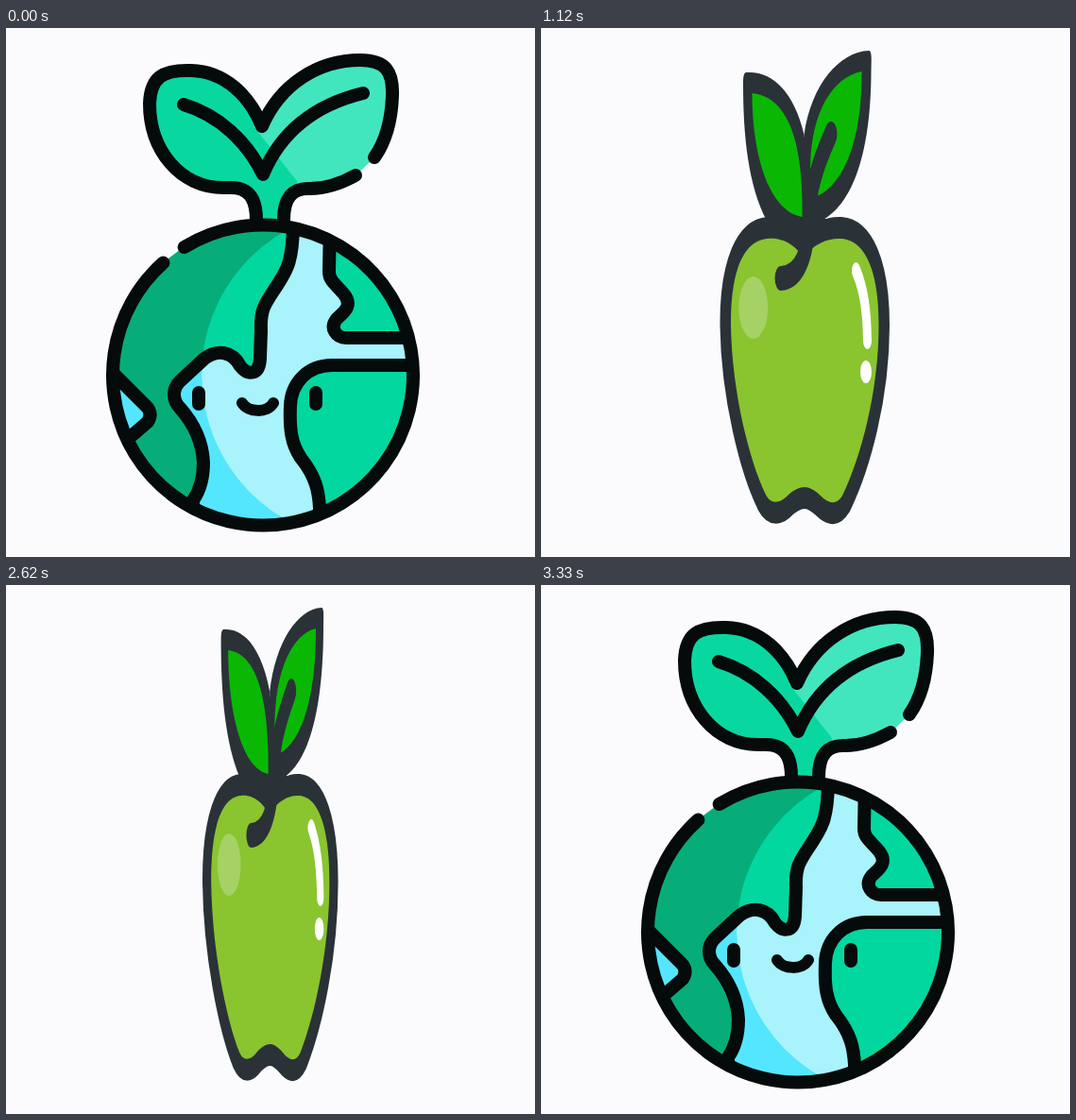
Recreate the animation shown at these times as an HTML page. Size 560 by 560 pixels, loop 3.75 s.

```html
<!DOCTYPE html>
<html lang="en">
<head>
<meta charset="utf-8">
<title>Globe and apple</title>
<style>
  html, body { margin: 0; width: 100%; height: 100%; overflow: hidden; background: #fbfbfd; }
  svg { display: block; width: 100vw; height: 100vh; }
  .ink { fill: none; stroke: #050a0a; stroke-width: 14; stroke-linecap: round; stroke-linejoin: round; }
</style>
</head>
<body>
<svg viewBox="0 0 560 560">
  <defs>
    <clipPath id="disc"><circle cx="272" cy="367.5" r="159"/></clipPath>
    <clipPath id="lit"><circle cx="383" cy="367.5" r="176"/></clipPath>
    <clipPath id="litLeaf"><path d="M262 104L308 162V180H440V20H271V104Z"/></clipPath>
    <path id="sea" d="M304 205C304 250 296 258 286 274C274 292 269 298 270 320L269 350C268 368 256 368 248 358C240 342 224 340 210 350L184 374C176 382 176 394 184 402C200 420 208 438 209 460C209 478 205 490 198 500V540H332V508C331 490 328 475 312 455C302 440 300 425 301 400C302 375 320 357 345 357H445V328H360C350 328 342 318 350 308C356 302 368 295 358 282C350 272 342 268 342 258L343 205Z"/>
    <path id="lake" d="M100 352L150 402Q155 409 150 417L128 436L100 450Z"/>
    <path id="leaves" d="M271 104C258 72 232 46 196 45C166 44 153 52 152 80C152 130 185 169 230 169H238C255 169 265 178 265 206H294C294 180 303 169 322 170C335 170 352 166 370 156L390 137C402 120 408 98 409 72C410 46 402 34 375 34C330 34 290 60 271 104Z"/>
  </defs>

  <g id="globe">
    <use href="#leaves" fill="#08d8a0"/>
    <use href="#leaves" fill="#41e6bf" clip-path="url(#litLeaf)"/>
    <g clip-path="url(#disc)">
      <rect x="100" y="200" width="345" height="340" fill="#06ad79"/>
      <g fill="#55e6ff"><use href="#sea"/><use href="#lake"/></g>
      <g clip-path="url(#lit)">
        <rect x="200" y="200" width="245" height="340" fill="#02d7a0"/>
        <use href="#sea" fill="#a8f3fc"/>
      </g>
      <g class="ink"><use href="#sea"/><use href="#lake"/></g>
    </g>
    <g class="ink">
      <circle cx="272" cy="367.5" r="159" pathLength="360" stroke-dasharray="350 10" transform="rotate(238.4 272 367.5)"/>
      <path d="M390 137C402 120 408 98 409 72C410 46 402 34 375 34C330 34 290 60 271 104C258 72 232 46 196 45C166 44 153 52 152 80C152 130 185 169 230 169H238C255 169 265 178 265 203"/>
      <path d="M370 156C352 166 335 170 322 170C303 169 294 180 294 203"/>
      <path d="M188 81C225 92 255 120 272 155C290 112 325 82 378 69"/>
      <path d="M204 386V398M328 386V398"/>
      <path style="stroke-width:12" d="M250 397C256 407 277 408 283 397"/>
    </g>
  </g>

  <g id="apple">
    <g fill="#2a3238">
      <rect x="198" y="202" width="156" height="40"/>
      <path d="M153 47C147 47 146 52 146 60C146 115 157 167 196 204L286 206V150L275 113C254 68 208 45 153 47Z"/>
      <path d="M412 24C418 24 418 30 417 45C417 115 391 185 308 205L290 206L275 113C290 60 350 25 412 24Z"/>
    </g>
    <path fill="#8ac42f" stroke="#2a3238" stroke-width="46" stroke-linejoin="round" paint-order="stroke" d="M272 242C250 226 222 222 198 223C146 225 119 258 120 315C122 385 160 460 195 495C205 504 222 503 236 497C250 490 262 486 276 486C290 486 304 492 316 498C332 504 345 504 356 495C395 455 433 385 433 315C433 258 406 225 354 223C325 222 300 228 272 242Z"/>
    <g fill="#0ab804">
      <path d="M165 69C222 72 274 100 271 200C205 195 165 140 165 69Z"/>
      <path d="M397 46C398 115 362 165 302 178L288 150C288 90 335 52 397 46Z"/>
    </g>
    <path fill="none" stroke="#2a3238" stroke-width="26" stroke-linecap="round" d="M332 112C300 148 288 172 286 200C284 240 265 264 226 265"/>
    <ellipse cx="167.5" cy="296" rx="31" ry="33" fill="#a5d165"/>
    <path fill="none" stroke="#fff" stroke-width="18" stroke-linecap="round" d="M385 257C402 277 408 300 409 331"/>
    <circle cx="406" cy="364" r="12" fill="#fff"/>
  </g>
</svg>
<script>
  const LOOP = 3750, TICK = 125 / 3;
  const globe = document.getElementById("globe");
  const apple = document.getElementById("apple");

  // Ten width steps; the first or last three hold for two ticks.
  const stepTime = (start, ticks) => Math.round((start + ticks * TICK) / 10) * 10;
  const shrinkTicks = i => i < 4 ? 2 * i : i + 3;
  const growTicks = i => i < 7 ? i : 2 * i - 6;

  function stepsDone(t, start, ticksOf) {
    let n = 0;
    while (n < 10 && t >= stepTime(start, ticksOf(n))) n++;
    return n / 10;
  }
  const shrink = (t, start) => 1 - stepsDone(t, start, shrinkTicks);
  const grow = (t, start) => stepsDone(t, start, growTicks);

  function setWidth(group, scale, axis) {
    group.style.display = scale > 0.01 ? "" : "none";
    group.setAttribute("transform", `translate(${axis * (1 - scale)} 0) scale(${scale} 1)`);
  }

  function draw(t) {
    setWidth(globe, t < 950 ? shrink(t, 410) : grow(t, 2830), 272.5);
    setWidth(apple, t < 2290 ? grow(t, 950) : shrink(t, 2290), 282);
  }

  const began = performance.now();
  function loop() {
    draw((performance.now() - began) % LOOP);
    requestAnimationFrame(loop);
  }
  loop();
</script>
</body>
</html>
```
